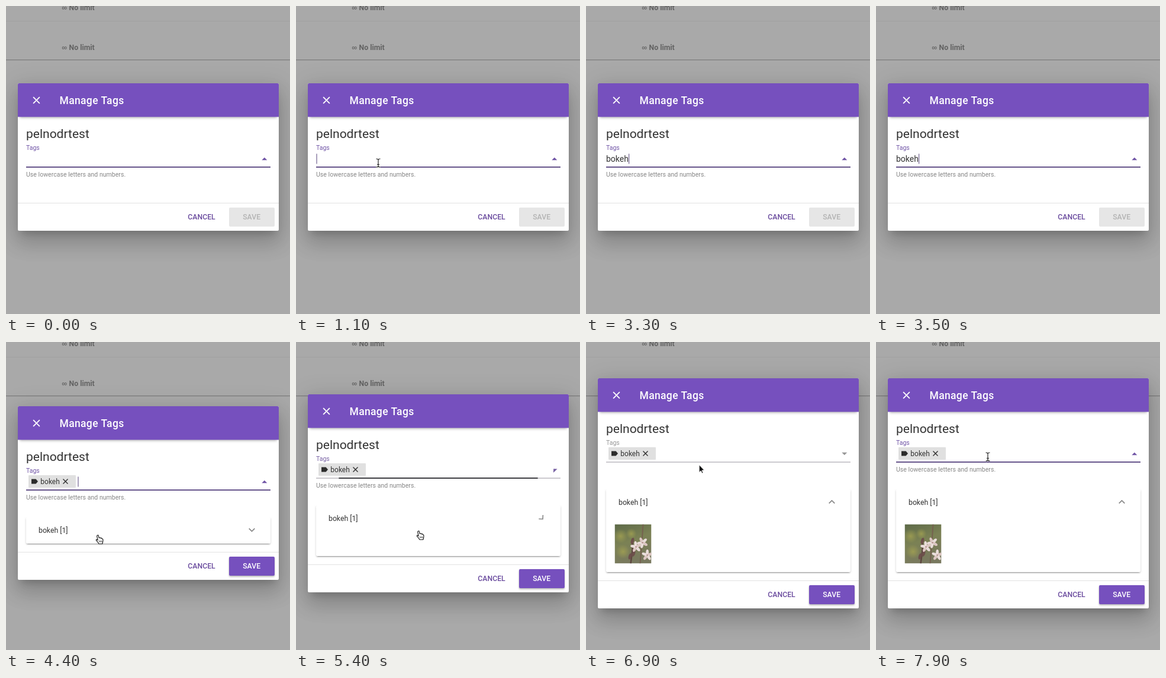
An HTML page with a canvas for the animation above (8 s loop, 480x518 px).

```html
<!DOCTYPE html>
<html lang="en">
<head>
<meta charset="utf-8">
<title>Manage Tags</title>
<style>
  html, body { margin: 0; width: 100%; height: 100%; overflow: hidden; background: #a9a9a9; }
  canvas { display: block; width: 480px; height: 518px; }
</style>
</head>
<body>
<canvas id="stage"></canvas>
<script>
const W = 480, H = 518, LOOP = 8000;
const canvas = document.getElementById('stage');
const ctx = canvas.getContext('2d');
const dpr = window.devicePixelRatio || 1;
canvas.width = W * dpr;
canvas.height = H * dpr;

const PURPLE = '#7650be', ACCENT = '#6a4b9e', INK = '#333';
const LEFT = 20, WIDTH = 441, FIELD_X = 34, FIELD_W = 413;
const KEY_TIMES = [2200, 2350, 2500, 2650, 2800];
const CHIP_AT = 3600, OPEN_AT = 5317, REFOCUS_AT = 7100;

// Pointer path: time, x, y
const PATH = [
  [500, 150, 470], [950, 139, 264], [4150, 139, 264], [4400, 158, 332],
  [4950, 210, 325], [6500, 210, 325], [7000, 189, 193]
];

const ease = (t, start, length) => {
  const p = Math.min(1, Math.max(0, (t - start) / length));
  return p * p * (3 - 2 * p);
};

// Soft start with a long tail
const settle = (t, start) => 1 - Math.exp(-((Math.max(0, t - start) / 118) ** 1.7));

// Half turn to the left, lagging behind the opening
const halfTurn = open => -Math.PI * open ** 1.7;

const mix = (a, b, p) => `rgb(${a.map((v, i) => Math.round(v + (b[i] - v) * p)).join()})`;

function rect(x, y, w, h, color, radius = 0) {
  ctx.fillStyle = color;
  ctx.beginPath();
  ctx.roundRect(x, y, w, h, radius);
  ctx.fill();
}

function text(str, x, y, size, color, weight = 400, align = 'left', spacing = 0) {
  ctx.font = `${weight} ${size}px Roboto, sans-serif`;
  ctx.letterSpacing = spacing + 'px';
  ctx.textAlign = align;
  ctx.fillStyle = color;
  ctx.fillText(str, x, y);
}

function poly(points, fill, stroke, width = 1, close = true) {
  ctx.beginPath();
  points.forEach(([x, y]) => ctx.lineTo(x, y));
  if (close) ctx.closePath();
  if (fill) { ctx.fillStyle = fill; ctx.fill(); }
  if (stroke) { ctx.strokeStyle = stroke; ctx.lineWidth = width; ctx.stroke(); }
}

function at(x, y, angle, draw) {
  ctx.save();
  ctx.translate(x, y);
  ctx.rotate(angle);
  draw();
  ctx.restore();
}

// CSS-style box shadow, cast by a box placed off the stage
function shadow(x, y, w, h, dy, blur, spread, alpha) {
  const far = 2000;
  ctx.save();
  ctx.shadowColor = `rgba(0,0,0,${alpha})`;
  ctx.shadowBlur = blur * dpr;
  ctx.shadowOffsetX = far * dpr;
  ctx.shadowOffsetY = dy * dpr;
  rect(x - spread - far, y - spread, w + 2 * spread, h + 2 * spread, '#000', 2);
  ctx.restore();
}

function cross(x, y, r, color, width) {
  poly([[x - r, y - r], [x + r, y + r]], null, color, width, false);
  poly([[x + r, y - r], [x - r, y + r]], null, color, width, false);
}

function backdrop() {
  rect(0, 0, W, H, '#a9a9a9');
  rect(0, 25, W, 1, '#a1a1a1');
  rect(0, 90, W, 1.3, '#7c7c7c');
  for (const y of [7, 74]) {
    ctx.font = 'bold 12.25px "Liberation Sans", sans-serif';
    ctx.letterSpacing = '0px';
    ctx.textAlign = 'left';
    ctx.fillStyle = '#666';
    ctx.fillText('∞', 94.5, y);
    text('No limit', 106.5, y, 12.25, '#626262', 700);
  }
}

function photo(x, y) {
  const w = 62, h = 66;
  ctx.save();
  ctx.beginPath();
  ctx.rect(x, y, w, h);
  ctx.clip();
  ctx.translate(x, y);
  const base = ctx.createLinearGradient(0, 0, w * 0.4, h);
  base.addColorStop(0, '#5d6a48');
  base.addColorStop(0.5, '#7b8154');
  base.addColorStop(1, '#79795f');
  rect(0, 0, w, h, base);
  for (const [cx, cy, r] of [[10, 20, 12], [14, 46, 12], [28, 16, 9]]) {
    const glow = ctx.createRadialGradient(cx, cy, 0, cx, cy, r);
    glow.addColorStop(0, 'rgba(166,164,82,.75)');
    glow.addColorStop(1, 'rgba(166,164,82,0)');
    rect(0, 0, w, h, glow);
  }
  poly([[27, 66], [30, 44], [30, 24]], null, '#5c463f', 2.5, false);
  poly([[43, 66], [46, 30], [48, 0]], null, '#75604f', 2, false);
  const petal = (px, py, angle, rx, ry, color) => {
    ctx.fillStyle = color;
    ctx.beginPath();
    ctx.ellipse(px, py, rx, ry, angle, 0, 7);
    ctx.fill();
  };
  for (const [px, py] of [[30, 28], [32, 49], [26, 54]]) petal(px, py, 0.3, 2.6, 5.5, '#6d504b');
  for (const [px, py] of [[47, 31], [36, 38], [55, 52]]) {
    for (let i = 0; i < 5; i++) {
      const a = i * 1.257 + px;
      petal(px + 4.5 * Math.cos(a), py + 4.5 * Math.sin(a), a, 5, 2.4, i % 2 ? '#dcc6c2' : '#eaddda');
    }
    petal(px, py, 0, 1.3, 1.3, '#b08c88');
  }
  ctx.restore();
}

function panel(y, h, open, showPhoto) {
  ctx.save();
  ctx.beginPath();
  ctx.rect(FIELD_X - 8, y, FIELD_W + 16, h + 12);
  ctx.clip();
  shadow(FIELD_X, y, FIELD_W, h, 2.6, 1, -1.7, 0.2);
  shadow(FIELD_X, y, FIELD_W, h, 1.7, 1.7, 0, 0.14);
  shadow(FIELD_X, y, FIELD_W, h, 0.9, 4.4, 0, 0.12);
  rect(FIELD_X, y, FIELD_W, h, '#fff', 2);
  text('bokeh [1]', 55, y + 26, 12.25, INK);
  at(415.5, y + 21, halfTurn(open), () =>
    poly([[-4.8, -2.4], [0, 2.4], [4.8, -2.4]], null, '#858585', 1.6, false));
  if (showPhoto) photo(48.5, y + 58.5);
  ctx.restore();
}

function chip(top) {
  rect(38, top + 116, 80, 21, '#e0e0e0', 1);
  const y = top + 126.5;
  poly([[43, y - 4], [50.5, y - 4], [54, y], [50.5, y + 4], [43, y + 4]], '#2c2c2c');
  text('bokeh', 58.3, top + 130.5, 12, INK);
  cross(100.5, y, 4, INK, 1.4);
}

function field(t, top, focus, arrowOpen) {
  const tagged = t >= CHIP_AT;
  const focused = t < OPEN_AT || t >= REFOCUS_AT;
  const tint = mix([150, 150, 150], [112, 84, 166], focus);
  text('Tags', FIELD_X, top + 112.3, 10.5, tint);

  const typed = 'bokeh'.slice(0, KEY_TIMES.filter(k => t >= k).length);
  let caretX = 35;
  if (tagged) {
    chip(top);
    caretX = 122;
  } else {
    text(typed, FIELD_X, top + 131.7, 14, INK);
    if (typed) caretX = FIELD_X + ctx.measureText(typed).width + 0.7;
  }
  const typing = t >= KEY_TIMES[0] && t < KEY_TIMES[4] + 200;
  if (focused && (typing || (t + 950) % 1000 < 500)) {
    rect(caretX - 0.5, top + 118.5, 1, 17, '#55437a');
  }

  rect(FIELD_X, top + 140.5, FIELD_W, 1, '#9a969f');
  const line = FIELD_W * focus;
  rect(FIELD_X + (FIELD_W - line) / 2, top + 140, line, 1.8, focused ? '#594482' : '#2b2b2f');
  at(436.8, top + 127, halfTurn(arrowOpen), () =>
    poly([[-4.5, 2.2], [0, -2.3], [4.5, 2.2]], tint));

  ctx.globalAlpha = Math.min(1, Math.max(0, (focus - 0.1) / 0.6));
  text('Use lowercase letters and numbers.', FIELD_X, top + 157.3, 10.5, '#858585', 400, 'left', 0.04);
  ctx.globalAlpha = 1;
}

function dialog(t) {
  const tagged = t >= CHIP_AT;
  const open = settle(t, OPEN_AT);
  const focus = 1 - ease(t, OPEN_AT, 305) + ease(t, REFOCUS_AT, 305);
  const arrowOpen = open * (1 - ease(t, REFOCUS_AT, 225));
  const panelH = tagged ? Math.round(44 + 95 * open) : 0;
  const h = 248 + panelH;
  const top = Math.round(254 - h / 2), bottom = top + h;

  shadow(LEFT, top, WIDTH, h, 9.6, 13, -6, 0.18);
  shadow(LEFT, top, WIDTH, h, 21, 33, 2.6, 0.12);
  shadow(LEFT, top, WIDTH, h, 8, 40, 7, 0.12);
  rect(LEFT, top, WIDTH, h, '#fff', 2);

  shadow(LEFT + 3, top + 40, WIDTH - 6, 16.5, 1.5, 4, 0, 0.3);
  rect(LEFT, top, WIDTH, 56.5, PURPLE, [2, 2, 0, 0]);
  cross(51.5, top + 28.5, 5.4, '#fff', 1.8);
  text('Manage Tags', 90.5, top + 34.6, 17.5, '#fff', 500, 'left', 0.34);

  text('pelnodrtest', FIELD_X, top + 92, 21, INK);
  field(t, top, focus, arrowOpen);
  if (tagged) panel(top + 187, panelH, open, t >= 5450);

  rect(LEFT, bottom - 47, WIDTH, 1, '#e2e2e2');
  text('CANCEL', 330.5, bottom - 19.3, 12.25, ACCENT, 500, 'center');
  if (tagged) {
    shadow(377, bottom - 39, 77, 32, 1.7, 3, 0, 0.3);
    rect(377, bottom - 39, 77, 32, PURPLE, 2);
  } else {
    rect(377, bottom - 39, 77, 32, '#e6e6e6', 2);
  }
  text('SAVE', 415.2, bottom - 19.3, 12.25, tagged ? '#fff' : '#b3b3b3', 500, 'center');
}

function pointerAt(t) {
  let i = 0;
  while (i < PATH.length - 2 && t >= PATH[i + 1][0]) i++;
  const [t0, x0, y0] = PATH[i], [t1, x1, y1] = PATH[i + 1];
  const p = ease(t, t0, t1 - t0);
  return [x0 + (x1 - x0) * p, y0 + (y1 - y0) * p];
}

function beam() {
  const shape = () => {
    ctx.beginPath();
    ctx.moveTo(-3.5, -7); ctx.quadraticCurveTo(0, -7, 0, -5);
    ctx.quadraticCurveTo(0, -7, 3.5, -7);
    ctx.moveTo(0, -5); ctx.lineTo(0, 5);
    ctx.moveTo(-3.5, 7); ctx.quadraticCurveTo(0, 7, 0, 5);
    ctx.quadraticCurveTo(0, 7, 3.5, 7);
    ctx.moveTo(-2, 2.5); ctx.lineTo(2, 2.5);
    ctx.stroke();
  };
  ctx.strokeStyle = '#fff'; ctx.lineWidth = 2.6; shape();
  ctx.strokeStyle = '#222'; ctx.lineWidth = 1.2; shape();
}

function hand() {
  ctx.lineJoin = 'round';
  poly([[-3.6, -7], [-2, -7.2], [-0.8, -2.5], [1, -3], [2, -2.2], [3.4, -2.4], [4.2, -1.2],
        [5.4, -1], [6, 1], [5.6, 4.5], [4.8, 7.5], [-1, 7.5], [-3.2, 4.2], [-5.6, 1.6],
        [-5.4, 0], [-3.6, 0.6], [-2.8, 1.4], [-4.4, -5.6]], '#fff', '#222', 1.2);
  for (const x of [0, 2, 4]) poly([[x - 0.3, 2], [x, 5]], null, '#222', 0.8, false);
}

function arrow() {
  poly([[0, 0], [0, 13], [3, 10.2], [5, 14.6], [7, 13.8], [5, 9.5], [9, 9.3]], '#111', '#fff');
}

function pointer(t) {
  const hidden = t < 500 || (t >= KEY_TIMES[0] && t < 4200);
  if (hidden) return;
  const [x, y] = pointerAt(t);
  let shape = arrow;
  if (t < 4200) shape = y < 272 ? beam : arrow;
  else if (t < OPEN_AT) shape = y > 295 ? hand : arrow;
  else if (y < 203) shape = beam;
  else if (y > 248) shape = hand;
  at(x, y, 0, shape);
}

function frame(now) {
  const t = now % LOOP;
  ctx.setTransform(dpr, 0, 0, dpr, 0, 0);
  backdrop();
  dialog(t);
  pointer(t);
}

const start = performance.now();
function tick() {
  frame(performance.now() - start);
  requestAnimationFrame(tick);
}
tick();
</script>
</body>
</html>
```
